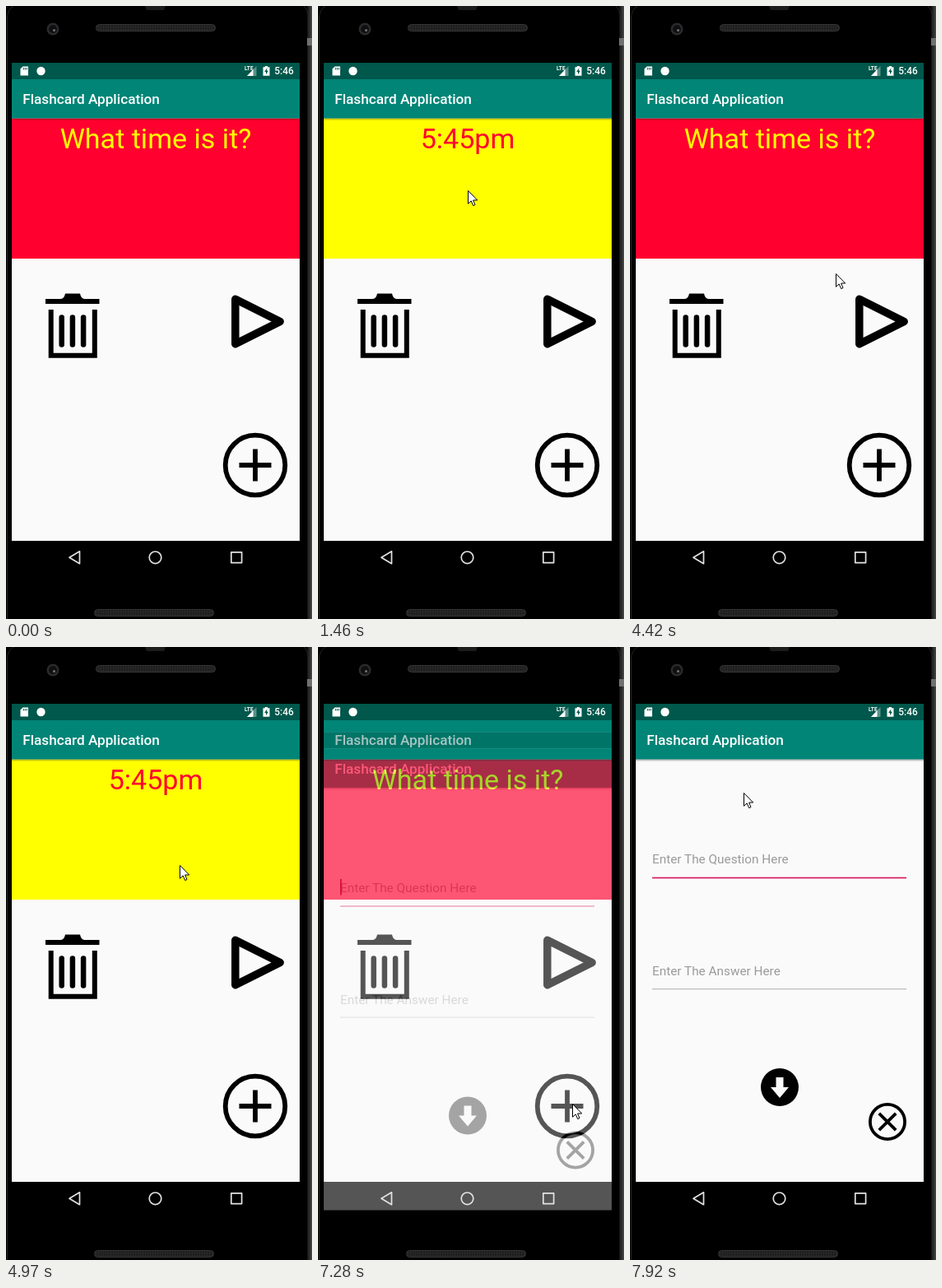
An HTML page that plays this animation: 372x745 px, repeating every 8 s.

```html
<!DOCTYPE html>
<html lang="en">
<head>
<meta charset="utf-8">
<title>Flashcards</title>
<style>
html, body { margin: 0; width: 100%; height: 100%; overflow: hidden; background: #000; }
svg { display: block; width: 372px; height: 745px; }
text { font-family: Roboto, sans-serif; }
.title { font-size: 17.2px; font-weight: 500; fill: #fff; }
.card { font-size: 34.07px; text-anchor: middle; }
.hint { font-size: 15.33px; fill: #9a9a9a; }
</style>
</head>
<body>
<svg viewBox="0 0 372 745">
  <defs>
    <linearGradient id="shade" x1="0" y1="0" x2="0" y2="1">
      <stop offset="0" stop-color="#000" stop-opacity=".32"/>
      <stop offset="1" stop-color="#000" stop-opacity="0"/>
    </linearGradient>
    <linearGradient id="rim">
      <stop offset="0" stop-color="#0c0c0c"/>
      <stop offset=".5" stop-color="#2c2c2c"/>
      <stop offset="1" stop-color="#484848"/>
    </linearGradient>
    <pattern id="mesh" width="3" height="3" patternUnits="userSpaceOnUse">
      <rect width="3" height="3" fill="#1d1d1d"/>
      <circle cx="1.5" cy="1.5" r=".9" fill="#303030"/>
    </pattern>
    <clipPath id="screen"><rect x="7" y="69" width="350" height="616"/></clipPath>
    <g id="bars">
      <rect x="7" y="69" width="350" height="20" fill="#00574b"/>
      <rect x="7" y="89" width="350" height="47.5" fill="#008577"/>
      <rect x="7" y="136.5" width="350" height="3" fill="url(#shade)"/>
      <text class="title" x="20.2" y="119.3">Flashcard Application</text>
    </g>
  </defs>

  <!-- phone body -->
  <rect width="372" height="745" fill="#000"/>
  <rect x="366" width="6" height="745" fill="url(#rim)"/>
  <path d="M1.5 745V14Q2 4 9 0M362 0Q367.500 5 367.500 16V745" fill="none" stroke="#252525"/>
  <rect x="366" y="39" width="6" height="9" fill="#707070"/>
  <path d="M169 0H194L192 5H171Z" fill="#1c1c1c"/>
  <g fill="url(#mesh)" stroke="#363636">
    <rect x="109.500" y="22.500" width="145" height="8" rx="4"/>
    <rect x="107.500" y="733.500" width="145" height="8" rx="4"/>
  </g>
  <circle cx="57" cy="28" r="7.500" fill="#2b2b2b"/>
  <circle cx="57" cy="28" r="5" fill="#101012"/>
  <circle cx="58.500" cy="29.500" r="1.500" fill="#77777c"/>

  <g clip-path="url(#screen)">
    <!-- card view -->
    <g>
      <rect x="7" y="69" width="350" height="581" fill="#fafafa"/>
      <rect id="face" x="7" y="136.500" width="350" height="170.500"/>
      <text id="word" class="card" x="182" y="173"></text>
      <use href="#bars"/>
      <path d="M48 362V356H67Q71 355 72 349.500H90Q91 355 95 356H113.500V362Z"/>
      <path d="M54.700 369V424.800H107.800V369" fill="none" stroke="#000" stroke-width="6"/>
      <path d="M67.700 378.500V411.500M80.900 378.500V411.500M94.100 378.500V411.500" stroke="#000" stroke-width="6.500" stroke-linecap="round"/>
      <path d="M278.800 356.300L333.200 383.500L278.800 410.700Z" fill="none" stroke="#000" stroke-width="9.500" stroke-linejoin="round"/>
      <g fill="none" stroke="#000" stroke-width="5.800">
        <circle cx="303" cy="558" r="36.300"/>
        <path d="M283.500 558H322.500M303 538.500V577.500"/>
      </g>
    </g>
    <!-- entry view -->
    <g id="form">
      <rect x="7" y="69" width="350" height="581" fill="#fafafa"/>
      <use href="#bars"/>
      <text class="hint" x="27" y="263.300">Enter The Question Here</text>
      <rect x="27" y="279.700" width="309" height="1.700" fill="#d81b60"/>
      <rect id="caret" x="27" y="247.500" width="1.600" height="19.500" fill="#901040"/>
      <text class="hint" x="27" y="399">Enter The Answer Here</text>
      <rect x="27" y="415" width="309" height="1.300" fill="#bdbdbd"/>
      <circle cx="182" cy="535" r="23"/>
      <path d="M177.500 523H186.500V535H193L182 548L171 535H177.500Z" fill="#fafafa"/>
      <g fill="none" stroke="#000" stroke-width="3.800">
        <circle cx="313" cy="577" r="21.100"/>
        <path d="M302.800 566.800L323.200 587.200M323.200 566.800L302.800 587.200"/>
      </g>
    </g>
  </g>

  <!-- status icons -->
  <g fill="#fff">
    <path d="M20.500 73.500H27V84.500H17.500V76.500Z"/>
    <path d="M21.300 75V77.500M23.300 75V77.500M25.300 75V77.500" stroke="#00574b"/>
    <circle cx="42.500" cy="79" r="5.200"/>
    <text x="290" y="78" font-size="6.500" font-weight="700">LTE</text>
    <path d="M304.500 73V85H293Z" opacity=".35"/>
    <path d="M300.500 77.200V85H293Z"/>
    <path d="M314.800 73H318V74.300H320.500V84.700H312.500V74.300H314.800Z"/>
    <path d="M317.200 75.500L314.200 80H316V83.300L318.900 78.700H317.200Z" fill="#00574b"/>
    <text x="326.300" y="83.400" font-size="11.920" font-weight="500">5:46</text>
  </g>
  <g fill="none" stroke="#e2e2e2" stroke-width="1.700" stroke-linejoin="round">
    <path d="M89.500 662.800V677.700L77 670.200Z"/>
    <circle cx="181.500" cy="670.300" r="7.300"/>
    <rect x="273.800" y="663.800" width="12.800" height="12.800"/>
  </g>

  <path id="mouse" d="M.5.5V16.300L4.200 12.900L6.700 18.600L9 17.600L6.600 12H11.700Z" fill="#fff" stroke="#000"/>
</svg>
<script>
const LOOP = 8000;
const el = id => document.getElementById(id);
const face = el('face'), word = el('word'), form = el('form'), caret = el('caret'), mouse = el('mouse');
const RED = '#ff002f', YELLOW = '#ffff00';

// Each move: first step, last step, one pointer position per step.
const moves = [
  [380, 530, [[164, 539], [118, 400], [103, 319]]],
  [840, 1150, [[107, 298], [123, 238], [148, 200], [172, 208], [182, 224]]],
  [2250, 2730, line([182, 224], [279, 373], 7)],
  [4420, 4570, [[250, 325], [218, 276], [211, 265]]],
  [5660, 5970, [[186, 292], [137, 372], [168, 468], [254, 540], [293.5, 552]]],
  [6120, 6270, [[299, 550], [306, 553], [309, 555]]],
  [7690, 7920, [[294, 520], [232, 375], [164, 235], [138, 177]]]
];

function line(a, b, n) {
  return Array.from({ length: n }, (_, i) => {
    const u = (i + 1) / n, e = u * u * (3 - 2 * u);
    return a.map((v, k) => v + (b[k] - v) * e);
  });
}

function pointer(t) {
  let at = null;
  for (const [start, end, pts] of moves) {
    if (t < start) break;
    const gap = (end - start) / (pts.length - 1);
    at = pts[Math.min(pts.length - 1, Math.floor((t - start) / gap + 1e-6))];
  }
  return at;
}

// Entry view slides up and fades in: [offset, opacity].
function entry(t) {
  if (t < 7280) return [0, 0];
  if (t < 7450) return [34.5, 0.34];
  if (t < 7520) return [4, 0.93];
  return [0, 1];
}

function draw(t) {
  const back = (t >= 1460 && t < 2080) || (t >= 4970 && t < 5430);
  face.setAttribute('fill', back ? YELLOW : RED);
  word.setAttribute('fill', back ? RED : YELLOW);
  word.textContent = back ? '5:45pm' : 'What time is it?';

  const [dy, alpha] = entry(t);
  form.setAttribute('transform', `translate(0 ${dy})`);
  form.setAttribute('opacity', alpha);
  caret.setAttribute('opacity', t < 7765 ? 1 : 0);

  const p = pointer(t);
  mouse.setAttribute('opacity', p ? 1 : 0);
  if (p) mouse.setAttribute('transform', `translate(${p[0]} ${p[1]})`);
}

const began = performance.now();
function tick() {
  draw((performance.now() - began) % LOOP);
  requestAnimationFrame(tick);
}
draw(0);
requestAnimationFrame(tick);
</script>
</body>
</html>
```
